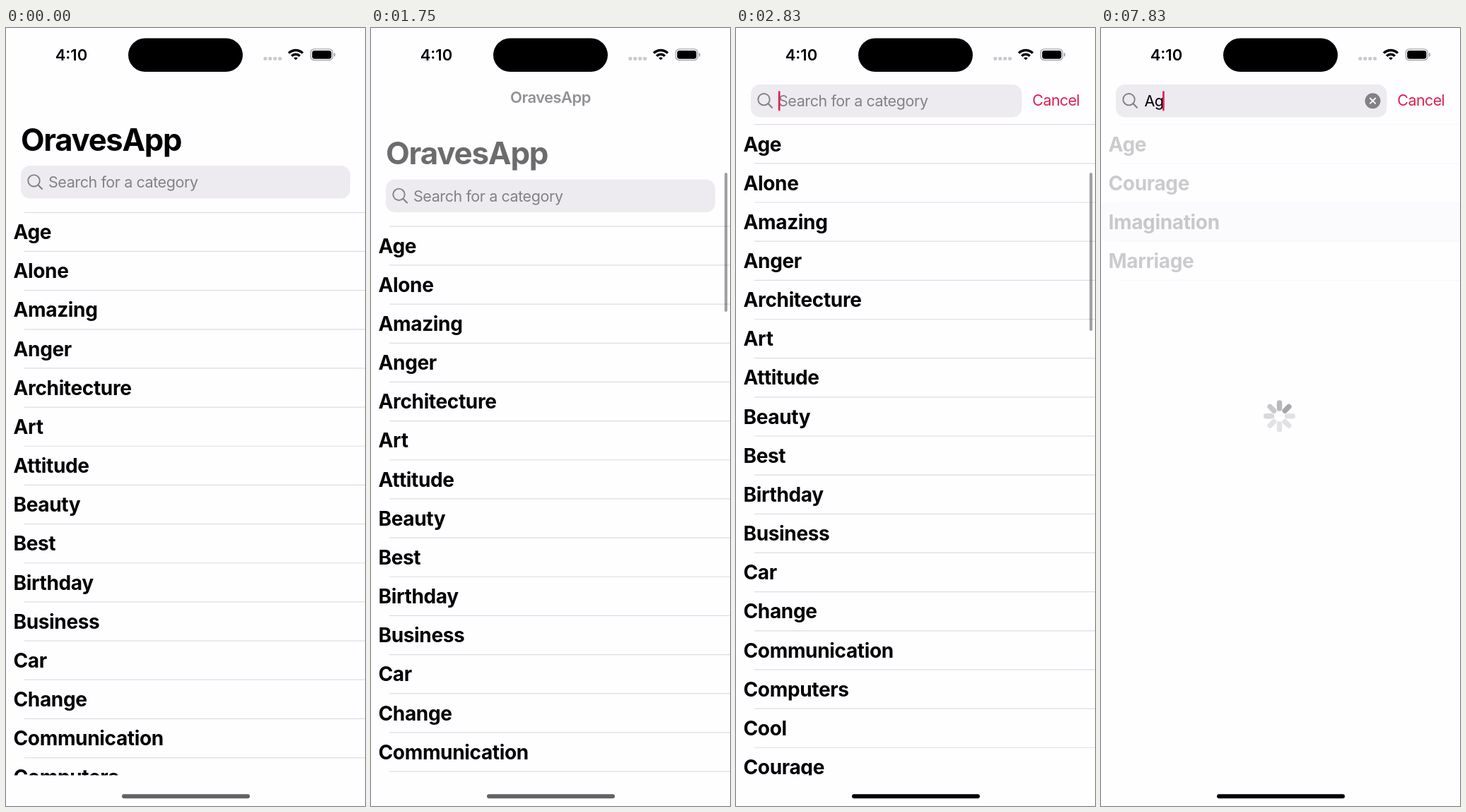
These frames come from a looping animation (508x1102 px, 8 s). An HTML page with a canvas:

```html
<!DOCTYPE html>
<html lang="en">
<head>
<meta charset="utf-8">
<title>OravesApp</title>
<style>
html, body { margin: 0; width: 100%; height: 100%; overflow: hidden; background: #fefdff; }
canvas { display: block; }
</style>
</head>
<body>
<canvas id="stage" width="508" height="1102"></canvas>
<script>
const ctx = document.getElementById('stage').getContext('2d');
const APP = 'OravesApp', BG = '#fefdff', RED = '#dc2350', GRAY = '#828186', RULE = '#dddce0';
const ROW = 55.16, COLLAPSE = 67.4;
const WORDS = ('Age Alone Amazing Anger Architecture Art Attitude Beauty Best Birthday Business Car ' +
  'Change Communication Computers Cool Courage Dad Dating Death Dreams Imagination Marriage').split(' ');

// Time k is counted in ticks of 1/12 s
const clamp = (v, lo, hi) => Math.max(lo, Math.min(hi, v));
const ramp = (k, from, to) => clamp((k - from) / (to - from), 0, 1);
const ease = (k, from, to) => {
  const u = ramp(k, from, to);
  return u * u * (3 - 2 * u);
};

const scrollAt = k => 142.3 * ease(k, 12, 16) - 161.8 * ease(k, 17, 21) + 19.5 * ease(k, 21, 28);
const searchAt = k => ease(k, 30, 34);
const smallTitleAt = k => ramp(k, 13, 15) - ramp(k, 19, 22.5);
const bigTitleAt = k => 1 - smallTitleAt(k) - ramp(k, 30, 32);
const pressAt = k => ramp(k, 29, 30) - ramp(k, 30, 33);
const scrollbarAt = k => ramp(k, 12, 13) - ramp(k, 40, 45);
const loadingAt = k => ramp(k, 90, 94);
const highlightAt = k => ramp(k, 88, 89) - .65 * ramp(k, 91, 94);
const queryAt = k => 'Ag'.slice(0, k < 59 ? 0 : k < 65 ? 1 : 2);

// The caret blinks every 12 ticks, counted from the last tap or key
function caretAt(k) {
  if (k < 30) return 0;
  const phase = (k - (k >= 65 ? 65 : k >= 59 ? 59 : 30)) % 12;
  return 1 - ramp(phase, 6, 8.5) + ramp(phase, 10, 12);
}

function text(str, x, y, size, weight, spacing, color, align = 'left') {
  ctx.font = `${weight} ${size}px Inter, sans-serif`;
  ctx.letterSpacing = spacing + 'px';
  ctx.textAlign = align;
  ctx.fillStyle = color;
  ctx.fillText(str, x, y);
  return ctx.measureText(str).width;
}

function box(x, y, w, h, r, color) {
  ctx.fillStyle = color;
  ctx.beginPath();
  ctx.roundRect(x, y, w, h, r);
  ctx.fill();
}

function line(x0, y0, x1, y1, width, color, cap = 'butt') {
  ctx.strokeStyle = color;
  ctx.lineWidth = width;
  ctx.lineCap = cap;
  ctx.beginPath();
  ctx.moveTo(x0, y0);
  ctx.lineTo(x1, y1);
  ctx.stroke();
}

function ring(x, y, r, width, color, from = 0, to = Math.PI * 2) {
  ctx.strokeStyle = color;
  ctx.lineWidth = width;
  ctx.lineCap = 'butt';
  ctx.beginPath();
  ctx.arc(x, y, r, from, to);
  ctx.stroke();
}

function group(alpha, draw) {
  if (alpha <= 0) return;
  ctx.save();
  ctx.globalAlpha *= alpha;
  draw();
  ctx.restore();
}

function clipRows(top, bottom) {
  ctx.beginPath();
  ctx.rect(0, top, 508, bottom - top);
  ctx.clip();
}

function drawStatusBar() {
  text('4:10', 69.7, 46, 22, 600, 0, '#000');
  box(173, 14.5, 162, 47.5, 23.75, '#000');
  for (let i = 0; i < 4; i++) box(364.5 + i * 6.9, 41, 4.8, 4.8, 1.5, '#c9c8cb');
  for (let i = 0; i < 3; i++) ring(410, 45.5, 2.4 + i * 5.8, 3.4, '#000', Math.PI * 1.25, Math.PI * 1.75);
  box(430.5, 29.2, 32.4, 17, 5.5, '#a3a2a5');
  box(431.8, 30.5, 29.8, 14.4, 4.5, BG);
  box(433.2, 31.9, 27.2, 11.8, 3.4, '#000');
  box(463.9, 35.3, 1.9, 5.2, 1, '#a3a2a5');
}

function drawList(k, top, query, barBottom) {
  group(1 - .8 * loadingAt(k), () => {
    clipRows(barBottom - 1, 1058.5);
    group(highlightAt(k), () => box(0, top + 2 * ROW, 508, ROW, 0, '#d1d0d6'));
    line(26, top, 508, top, 1.2, RULE);
    WORDS.filter(word => word.toLowerCase().includes(query.toLowerCase())).forEach((word, i) => {
      const y = top + i * ROW;
      text(word, 10.5, y + 37.8, 28, 650, -.35, '#000');
      line(26, y + ROW, 508, y + ROW, 1.2, RULE);
    });
  });
}

function drawField(k, y, search, query) {
  const mid = y + 23.3;
  box(21, y, 466 - 82.5 * search, 46.5, 13, `rgba(118,110,128,${.12 + .07 * pressAt(k)})`);
  ring(39.5, mid - 2, 8.2, 1.9, GRAY);
  line(45.6, mid + 4.1, 51, mid + 9.6, 2.2, GRAY, 'round');
  let caretX = 59.8;
  if (query) {
    caretX = 60 + text(query, 61.5, mid + 8, 21.5, 400, -.5, '#000');
    ring(384.5, mid, 5.5, 11, GRAY);
    for (const d of [-3.7, 3.7]) line(384.5 - d, mid - 3.7, 384.5 + d, mid + 3.7, 1.8, '#fff', 'round');
  } else {
    text('Search for a category', 60, mid + 8, 21.5, 400, -.42, GRAY);
  }
  group(caretAt(k), () => box(caretX, mid - 14, 2.7, 28, 1.2, RED));
  group(search, () => text('Cancel', 419.3 + 60 * (1 - search), mid + 7, 21.5, 400, -.6, RED));
}

function drawSpinner(k) {
  const head = 9 + Math.floor((k - 94) * 2 / 3);
  group(loadingAt(k), () => {
    ctx.translate(252.5, 549.8);
    for (let i = 0; i < 8; i++) {
      const age = (head - i + 8) % 8;
      box(-3.7, -22.6, 7.4, 15.4, 3.7, `rgba(0,0,0,${Math.max(.11, .34 - .065 * age)})`);
      ctx.rotate(Math.PI / 4);
    }
  });
}

function draw(k) {
  const query = queryAt(k), scroll = scrollAt(k), search = searchAt(k);
  const over = Math.max(0, -scroll), down = Math.max(0, scroll);
  const shift = Math.min(scroll, COLLAPSE);
  const listTop = 261.3 - 124.6 * search;
  const barBottom = listTop - shift;

  ctx.fillStyle = BG;
  ctx.fillRect(0, 0, 508, 1102);
  drawList(k, listTop - scroll, query, barBottom);

  group(ramp(scroll, COLLAPSE, COLLAPSE + 20), () => {
    box(0, 0, 508, barBottom, 0, '#f5f4f7');
    line(0, barBottom, 508, barBottom, 1, '#c9c8cc');
  });
  group(bigTitleAt(k), () => {
    clipRows(search ? 64 : 124, 1058);
    text(APP, 21, 173.5 - scroll - 115.1 * search, 43.5 * (1 + over * .00045), 700, -1.2, '#000');
  });
  group(smallTitleAt(k), () => text(APP, 254, 105.5, 22, 600, -.55, '#000', 'center'));
  drawField(k, 195 - shift - 115.1 * search, search, query);
  drawStatusBar();

  group(scrollbarAt(k), () =>
    box(500.3, 205 + down * .113, 4, 224 - over * 1.38 - down * .028, 2, 'rgba(0,0,0,.38)'));
  drawSpinner(k);
  box(164, 1085.2, 181, 6, 3, k < 30 ? '#626164' : '#000');
}

const start = performance.now();
function frame() {
  const t = (performance.now() - start) % 8000;
  draw(Math.floor((t + 5) * .012));
  requestAnimationFrame(frame);
}
frame();
</script>
</body>
</html>
```
